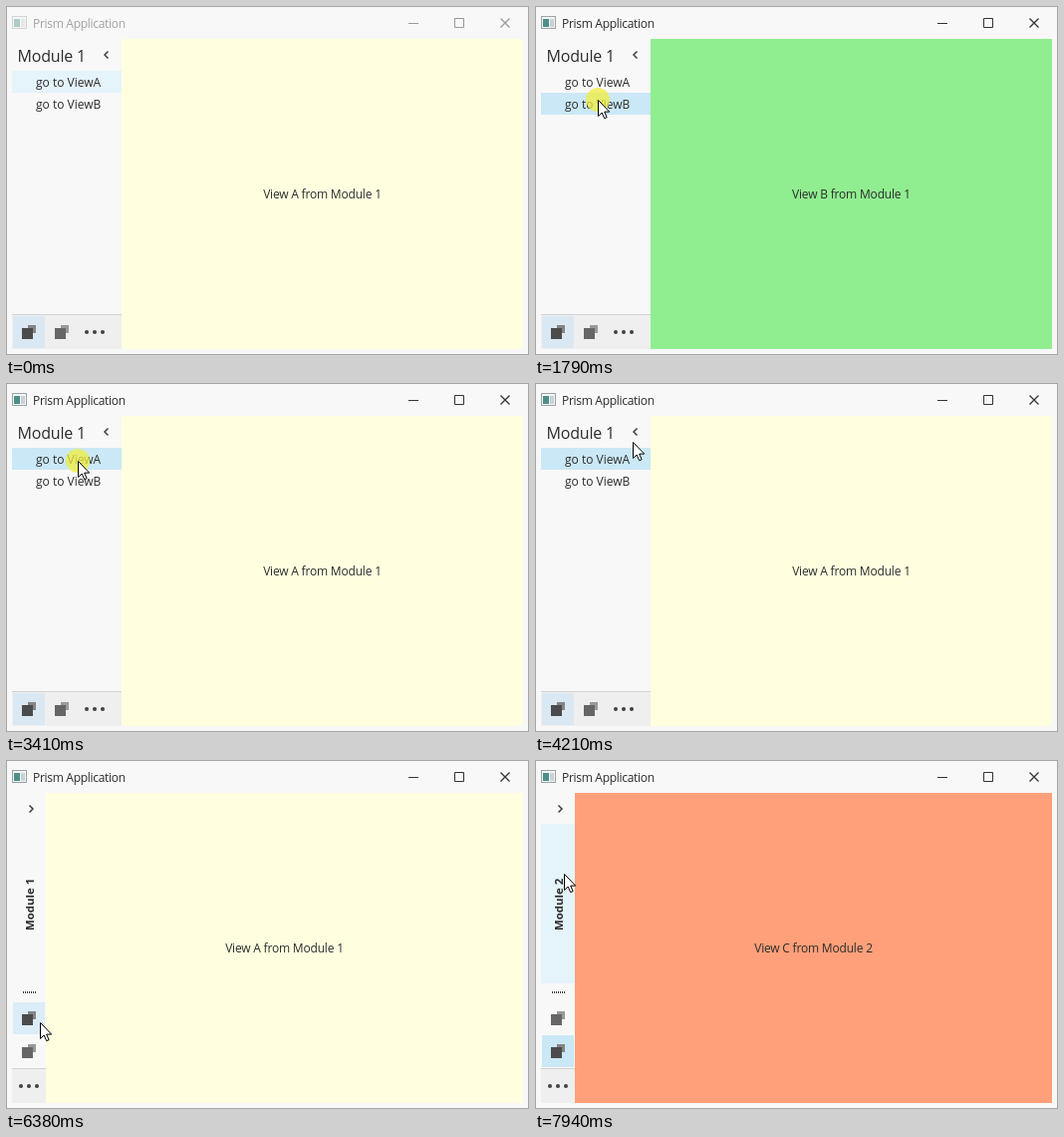
Write an HTML page that moves like this. It is 525 by 350 pixels and loops after 8 s.

```html
<!DOCTYPE html>
<html lang="en">
<head>
<meta charset="utf-8">
<title>Prism Application</title>
<style>
  html, body { margin: 0; width: 100%; height: 100%; overflow: hidden; }
  svg { display: block; width: 525px; height: 350px; font-family: "Open Sans", "Noto Sans", sans-serif; white-space: pre; }
</style>
</head>
<body>
<svg id="stage" viewBox="0 0 525 350"></svg>
<script>
const stage = document.getElementById('stage');
const LOOP = 8000, TICK = 78, COLLAPSE = 4980, CLICK = 160;
const INK = '#2c2c2c', GLYPH = '#404040', PANEL = '#f8f8f8', BAR = '#efefef';
const LIGHT = '#e5f3fb', SELECTED = '#cbe8f6';

// Mouse moves: start, end, x, y
const moves = [
  [290, 1070, 63, 94],
  [2940, 3250, 72, 78],
  [3570, 4210, 98, 59],
  [4290, 4670, 100, 53],
  [5310, 5920, 36, 180],
  [6000, 6220, 39, 249],
  [6300, 6700, 24, 291],
  [7480, 7940, 29, 114]
];
const clicks = [1690, 3410, 4830, 6850];

const box = (x, y, w, h, fill) => `<rect x="${x}" y="${y}" width="${w}" height="${h}" fill="${fill}"/>`;
const text = (x, y, size, s, extra = '') => `<text x="${x}" y="${y}" font-size="${size}" fill="${INK}" ${extra}>${s}</text>`;
const line = (d, color = GLYPH, w = 1) => `<path d="${d}" fill="none" stroke="${color}" stroke-width="${w}"/>`;
const tight = 'letter-spacing="-.2"';

function mouse(t) {
  let x = 266, y = 381;
  for (const [start, end, tx, ty] of moves) {
    if (t < start) break;
    const steps = Math.round((end - start) / TICK);
    const done = Math.floor((t - start) / (end - start) * steps + .01) + 1;
    const p = Math.min(1, done / (steps + 1));
    x += (tx - x) * p;
    y += (ty - y) * p;
  }
  return [Math.round(x), Math.round(y)];
}

function view(t) {
  if (t >= 7010) return ['View C from Module 2', '#ffa07a'];
  if (t >= 1790 && t < 3410) return ['View B from Module 1', '#90ee90'];
  return ['View A from Module 1', '#ffffe0'];
}

function moduleIcon(x, y, active, fill) {
  return box(x, y, 32, 32, fill) +
    box(x + 15, y + 9, 8, 8, active ? '#858585' : '#9a9a9a') +
    box(x + 9, y + 12, 11, 11, active ? '#4b4b4b' : '#666');
}

function bottomBar(width, dotX) {
  const dots = [0, 8, 16].map(d => `<circle cx="${dotX + d}" cy="327" r="2" fill="${GLYPH}"/>`);
  return box(6, 309, width, 35, BAR) + box(6, 309, width, 1, '#d2d2d2') + dots.join('');
}

function titleBar(active) {
  const c = active ? '#333' : '#999';
  return `<g opacity="${active ? 1 : .42}">` +
    '<rect x="6.5" y="10.5" width="14" height="12" fill="#f4f4f4" stroke="#9aa3a6"/>' +
    box(8, 13, 6, 8, '#4c8f88') + box(15, 13, 4, 8, '#c9d3d3') +
    text(27, 22, 12, 'Prism Application', 'letter-spacing="-.3"') + '</g>' +
    line('M404 17.5H414M450.5 12.5H459.5V21.5H450.5Z', c) +
    line('M496.5 12.5L505.5 21.5M505.5 12.5L496.5 21.5', c, 1.3);
}

function expanded(t, over) {
  const picked = t < 1690 ? '' : t < 3410 ? 'B' : 'A';
  const item = (name, y) => {
    const light = over(6, y, 110, 22) || (!picked && name === 'A');
    const fill = picked === name ? SELECTED : light ? LIGHT : 'none';
    return box(6, y, 110, 22, fill) + text(30, y + 16, 12, 'go to View' + name);
  };
  return text(11.5, 56, 16, 'Module 1', tight) +
    (over(92, 41, 16, 16) ? box(92, 41, 16, 16, LIGHT) : '') +
    line('M102.5 45.5L99 49L102.5 52.5', GLYPH, 1.5) +
    item('A', 65) + item('B', 87) + bottomBar(110, 81) +
    moduleIcon(7, 311, true, '#dae8f3') + moduleIcon(40, 311, false, 'none');
}

function collapsed(t, over) {
  const current = t < 7010 ? 1 : 2;
  const opacity = Math.min(1, Math.floor((t - COLLAPSE) / 80) / 4) ** 2.5;
  const icon = (n, y) => {
    const fill = n === current ? (n === 1 ? '#dbedf8' : SELECTED) : over(7, y, 32, 32) ? LIGHT : 'none';
    return moduleIcon(7, y, n === current, fill);
  };
  return `<g opacity="${opacity}">` +
    line('M23.5 45.5L27 49L23.5 52.5', GLYPH, 1.5) +
    (over(6, 64, 34, 160) ? box(6, 64, 34, 160, LIGHT) : '') +
    text(0, 0, 11.4, 'Module ' + current, 'font-weight="700" transform="translate(28 171) rotate(-90)"') +
    `<path d="M17 233H30" stroke="${GLYPH}" stroke-width="2" stroke-dasharray="1 1"/>` +
    icon(1, 243) + icon(2, 276) + bottomBar(34, 15) + '</g>';
}

function render(t) {
  const [mx, my] = mouse(t);
  const over = (x, y, w, h) => mx >= x && mx < x + w && my >= y && my < y + h;
  const [label, color] = view(t);
  const small = t >= COLLAPSE, left = small ? 40 : 116;
  const pressed = clicks.some(c => t >= c && t < c + CLICK);
  return box(0, 0, 525, 350, PANEL) + titleBar(t >= clicks[0]) +
    (small ? collapsed : expanded)(t, over) +
    box(left, 33, 519 - left, 311, color) +
    text((left + 519) / 2, 193, 12, label, tight + ' text-anchor="middle"') +
    '<rect x=".5" y=".5" width="524" height="349" fill="none" stroke="#a6a6a6"/>' +
    (pressed ? `<circle cx="${mx}" cy="${my}" r="12" fill="#f0ee3c" opacity=".75"/>` : '') +
    `<path transform="translate(${mx + .5} ${my + .5})" d="M0 0V16L3.7 12.5L6.2 18.2L8.6 17.2L6.2 11.6H11.2Z" fill="#fff" stroke="#000"/>`;
}

let shown = '';
function tick() {
  const next = render(performance.now() % LOOP);
  if (next !== shown) stage.innerHTML = shown = next;
  requestAnimationFrame(tick);
}
tick();
</script>
</body>
</html>
```
